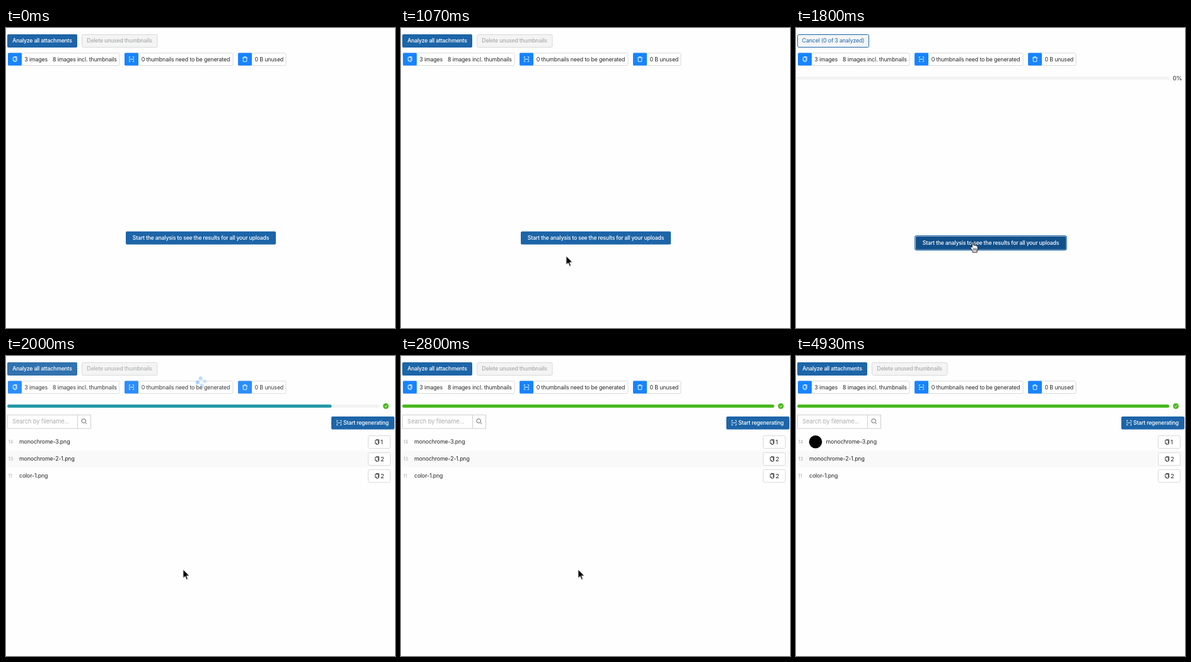
An HTML page that plays this animation: 617 by 476 pixels, repeating every 4990 ms.

```html
<!DOCTYPE html>
<html lang="en">
<head>
<meta charset="utf-8">
<title>Attachment analysis</title>
<style>
  html, body { margin: 0; width: 100%; height: 100%; overflow: hidden; background: #fefefe; }
  svg { display: block; }
  .stage {
    width: 617px; height: 476px;
    font: 8.8px Inter, "Open Sans", sans-serif;
    letter-spacing: -.14px;
    --blue: #1d65a8; --accent: #1784ff; --green: #48b81c;
  }
  text { fill: #262626; }
  .mid { text-anchor: middle; }
  .strong { font-size: 8.7px; font-weight: 500; letter-spacing: -.19px; }
  .white { fill: #fff; }
  .link { fill: var(--blue); }
  .id { font-size: 7px; fill: #a8a8a8; letter-spacing: 0; }
  .count { font-size: 9.6px; }
  .blue { fill: var(--blue); }
  .accent { fill: var(--accent); }
  .box { fill: #fff; stroke: #d9d9d9; }
  .line { fill: none; stroke: currentColor; stroke-width: .9; stroke-linejoin: round; }

  /* One shared 4.99 s timeline; 1670 ms = click, 1930 ms = results. */
  .idle, .running, .results, .ready, .plain, .thumb, .arrow, .hand, .cta, .ring, .face {
    animation: 4.99s step-end infinite;
  }
  .cursor, .fade, .spin, .bar { animation: 4.99s linear infinite; }

  .ready { animation-name: ready; }
  .running { animation-name: running; }
  .results { animation-name: results; }
  .idle { animation-name: idle; }
  .plain { animation-name: plain; }
  .thumb { animation-name: thumb; }
  .arrow { animation-name: arrow; }
  .hand { animation-name: hand; }
  .cta { animation-name: cta; }
  .ring { animation-name: running; }
  .face { animation-name: face; }
  .cursor { animation-name: cursor; }
  .fade { animation-name: fade; }
  .spin { animation-name: spin; }
  .bar { animation-name: bar; }
  .dots { transform-origin: 309.5px 41px; animation: turn 1.2s linear infinite; }

  @keyframes ready { 0%, 38.65% { visibility: visible } 33.45% { visibility: hidden } }
  @keyframes running { 0%, 38.65% { visibility: hidden } 33.45% { visibility: visible } }
  @keyframes results { 0% { visibility: hidden } 38.65%, 100% { visibility: visible } }
  @keyframes idle { 0% { visibility: hidden } 33.45%, 100% { visibility: visible } }
  @keyframes plain { 0% { transform: none } 98.78%, 100% { transform: translateX(26.5px) } }
  @keyframes thumb { 0% { opacity: 0 } 98.78%, 100% { opacity: 1 } }
  @keyframes arrow {
    0%, 24.03%, 97.58%, 100% { visibility: hidden }
    13.4%, 38.65% { visibility: visible }
  }
  @keyframes hand { 0%, 38.65%, 100% { visibility: hidden } 24.03% { visibility: visible } }
  @keyframes cta {
    0% { transform: none; visibility: visible }
    33.45% { transform: translateY(8px); visibility: visible }
    38.65%, 100% { transform: translateY(8px); visibility: hidden }
  }
  @keyframes face { 0% { fill: #1d65a8 } 24.03%, 100% { fill: #12508a } }
  @keyframes cursor {
    0%, 13.4% { transform: translate(253px, 468px) }
    16% { transform: translate(255px, 412px) }
    18.7% { transform: translate(258px, 378px) }
    21.4% { transform: translate(261.5px, 362px) }
    22.7% { transform: translate(268px, 353px) }
    25.4%, 92.2% { transform: translate(280.8px, 338.5px) }
    96.2%, 100% { transform: translate(325px, 239px) }
  }
  @keyframes fade {
    0%, 37.45%, 42.7%, 100% { opacity: 1 }
    38.65% { opacity: .7 }
    40.08% { opacity: .91 }
  }
  @keyframes spin {
    0%, 37.45%, 42.7%, 100% { opacity: 0 }
    38.65% { opacity: .7 }
    40.08% { opacity: .4 }
  }
  @keyframes bar {
    0%, 37.45% { width: 0; fill: #1784ff }
    38.65% { width: 300px; fill: #1784ff }
    40.08% { width: 514px; fill: #2499a8 }
    42.69% { width: 577px; fill: #3cae55 }
    46.7%, 100% { width: 590px; fill: #48b81c }
  }
  @keyframes turn { from { transform: rotate(0) } to { transform: rotate(360deg) } }
</style>
</head>
<body>
<svg class="stage" viewBox="0 0 617 476">
  <defs>
    <g id="copy" class="line">
      <path d="M-1.6 -3.8H3.1V2.6M-2.8 -2.8H1.9V3.8H-.8L-2.8 1.8ZM-.8 3.8V1.8H-2.8"/>
    </g>
    <g id="scan" class="line">
      <path d="M-3.5 -1.7V-3.7H-1.7M1.7 -3.7H3.5V-1.7M3.5 1.7V3.7H1.7M-1.7 3.7H-3.5V1.7M-4 0H4"/>
    </g>
    <g id="trash" class="line">
      <path d="M-4 -2.4H4M-1.6 -2.4V-3.8H1.6V-2.4M-3 -2.4L-2.6 3.8H2.6L3 -2.4"/>
    </g>
    <g id="badge">
      <rect class="box" x="574.5" y="-10" width="35" height="20" rx="2"/>
      <use href="#copy" x="588.5"/>
    </g>
  </defs>

  <g class="fade">
    <g class="ready">
      <rect class="blue" x="2" y="10" width="111" height="21" rx="2"/>
      <text class="mid strong white" x="57.5" y="23.2">Analyze all attachments</text>
      <rect x="120.5" y="10.5" width="119.500" height="20" rx="2" fill="#f4f4f4" stroke="#d8d8d8"/>
      <text class="mid strong" x="180" y="23.2" style="fill:#a7aaad">Delete unused thumbnails</text>
    </g>
    <g class="running">
      <rect x="2.500" y="10.500" width="113" height="20" rx="2" fill="#f3f5f6" stroke="#1d65a8"/>
      <text class="mid link" x="59" y="23.2">Cancel (0 of 3 analyzed)</text>
    </g>

    <rect class="box" x="3.500" y="39.800" width="176.500" height="19.700" rx="2"/>
    <rect class="box" x="188.500" y="39.800" width="171.500" height="19.700" rx="2"/>
    <rect class="box" x="368.500" y="39.800" width="75.500" height="19.700" rx="2"/>
    <g class="accent">
      <rect x="3" y="39.500" width="22" height="20" rx="1.500"/>
      <rect x="188" y="39.500" width="22" height="20" rx="1.500"/>
      <rect x="368" y="39.500" width="22" height="20" rx="1.500"/>
    </g>
    <g color="#fff">
      <use href="#copy" x="14" y="49.500"/>
      <use href="#scan" x="199" y="49.500"/>
      <use href="#trash" x="379" y="49.500"/>
    </g>
    <text x="29.300" y="53">3 images</text>
    <text x="74" y="53">8 images incl. thumbnails</text>
    <text x="214.700" y="53">0 thumbnails need to be generated</text>
    <text x="394.500" y="53">0 B unused</text>
  </g>

  <g class="spin">
    <g class="dots accent">
      <circle cx="311.500" cy="35.700" r="3"/>
      <circle cx="314.800" cy="43" r="3" opacity=".75"/>
      <circle cx="307.500" cy="46.300" r="3" opacity=".5"/>
      <circle cx="304.200" cy="39" r="3" opacity=".6"/>
    </g>
  </g>

  <g class="idle">
    <rect x="2" y="77" width="590" height="5" rx="2.500" fill="#f3f3f3"/>
    <rect class="bar" x="2" y="77" height="5" rx="2.500"/>
  </g>
  <text class="running" x="597.500" y="83" style="font-size:9.400px">0%</text>

  <g class="results">
    <circle cx="602.500" cy="79.500" r="4.500" fill="#48b81c"/>
    <path d="M600.500 79.600L602 81.200L604.600 77.900" fill="none" stroke="#fff" stroke-width=".9"/>

    <rect class="box" x="2.500" y="93.500" width="111" height="21.500" style="stroke:#cfcfcf"/>
    <rect class="box" x="113.500" y="93.500" width="21" height="21.500" style="stroke:#cfcfcf"/>
    <text x="10" y="107.300" style="font-size:9.400px;fill:#acacac">Search by filename...</text>
    <g class="line" color="#555">
      <circle cx="123.200" cy="103" r="3.300"/>
      <path d="M125.600 105.400L128.300 108.100"/>
    </g>

    <rect class="blue" x="516" y="96" width="100" height="20.500" rx="2"/>
    <use href="#scan" x="528.300" y="106" color="#fff"/>
    <text class="strong white" x="535" y="109.300">Start regenerating</text>

    <rect x="2" y="150" width="614" height="26.500" fill="#f9f9f9"/>
    <text class="id" x="3.800" y="138.500">14</text>
    <text class="id" x="3.800" y="165.500">13</text>
    <text class="id" x="3.800" y="192.500">11</text>
    <circle class="thumb" cx="31" cy="136.300" r="10.300"/>
    <text class="plain" x="21" y="139.300">monochrome-3.png</text>
    <text x="21" y="166.300">monochrome-2-1.png</text>
    <text x="21" y="193.300">color-1.png</text>
    <g color="#333">
      <use href="#badge" y="136.500"/>
      <use href="#badge" y="163.500"/>
      <use href="#badge" y="190.300"/>
    </g>
    <text class="count" x="594" y="139.800">1</text>
    <text class="count" x="594" y="166.800">2</text>
    <text class="count" x="594" y="193.600">2</text>
  </g>

  <g class="cta">
    <rect class="ring" x="188.700" y="321.700" width="240.300" height="22.600" rx="3" fill="#fff" stroke="#1d65a8" stroke-width="1.300"/>
    <rect class="face" x="190" y="322.700" width="238" height="20.800" rx="2"/>
    <text class="mid strong white" x="309" y="335.800">Start the analysis to see the results for all your uploads</text>
  </g>

  <g class="cursor">
    <path class="arrow" d="M0 0V14.200L3.300 11.200L5.500 16.500L7.800 15.500L5.600 10.400H10.200Z"
      fill="#000" stroke="#fff" stroke-width="1" stroke-linejoin="round"/>
    <g class="hand" stroke="#000" stroke-linejoin="round" stroke-linecap="round">
      <path fill="#fff" d="M-1.600 9V2Q-1.600 .7 -.4 .7Q.8 .7 .8 2V6.200Q1.900 5.200 3.200 6.500Q4.600 5.700 5.500 7.100Q7.500 6.700 7.500 8.600V11.500Q7.300 13.800 6.200 15V17.300H-.6V15.500L-4 10.500Q-4.600 8.900 -3.200 8.500Q-2.300 8.500 -1.600 9.500Z"/>
      <path fill="none" stroke-width=".8" d="M.8 11V14.500M2.900 11V14.500M5 11V14.500"/>
    </g>
  </g>
</svg>
</body>
</html>
```
